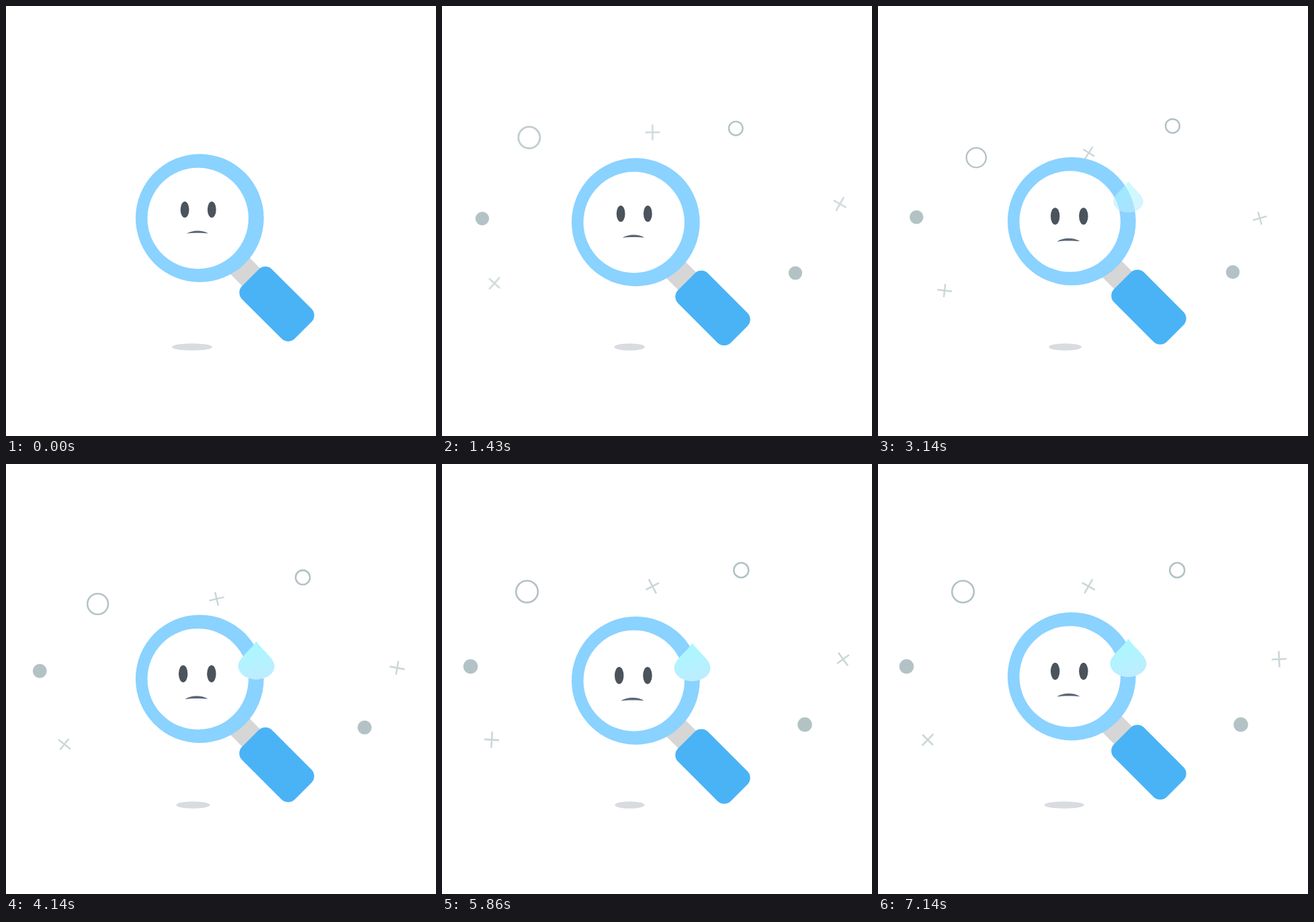
Write an HTML page that moves like this. It is 640 px wide and 640 px high and loops after 7.21 s.

```html
<!DOCTYPE html>
<html lang="en">
<head>
<meta charset="utf-8">
<title>Searching magnifier</title>
<style>
  html, body { margin: 0; width: 100%; height: 100%; overflow: hidden; background: #fff; }
  svg { display: block; width: 100vw; height: 100vh; }
  .ring { fill: none; stroke: #b3c2c6; stroke-width: 2.6; }
  .dot { fill: #b3c3c5; }
  .cross { fill: none; stroke: #cbd6d8; stroke-width: 2.6; }
</style>
</head>
<body>
<svg viewBox="0 0 640 640">
  <defs>
    <linearGradient id="water" x1="0" y1="0" x2="0.25" y2="1">
      <stop offset="0" stop-color="#a6faff"/>
      <stop offset="1" stop-color="#bcedff"/>
    </linearGradient>
    <path id="plus" class="cross" d="M-11 0H11M0-12V12"/>
  </defs>

  <ellipse id="shadow" cy="507.5" ry="5.2" fill="#d8dbe0"/>

  <!-- Particles are placed relative to the point they burst from -->
  <g id="slowBurst">
    <circle class="ring" cx="127.3" cy="-383" r="11"/>
    <circle class="dot" cx="-275.5" cy="-239.7" r="10.8"/>
    <circle class="dot" cx="222" cy="-153.2" r="10.8"/>
  </g>
  <g id="fastBurst">
    <circle class="ring" cx="-191.5" cy="-347" r="16.3"/>
    <g transform="translate(-244 -126.5)"><use id="leftCross" href="#plus"/></g>
    <g transform="translate(-4.7 -355)"><use id="topCross" href="#plus"/></g>
    <g transform="translate(279 -246.5)"><use id="rightCross" href="#plus"/></g>
  </g>

  <g id="magnifier">
    <g transform="translate(403 443.5) rotate(45)">
      <rect x="-105" y="-20" width="60" height="37.3" fill="#d6d6d6"/>
      <rect x="-55.5" y="-31.5" width="111" height="63" rx="14" fill="#4ab3f6"/>
    </g>
    <circle cx="288.3" cy="315.7" r="95.4" fill="#8ad2ff"/>
    <circle cx="285.7" cy="316" r="75.2" fill="#fff"/>
    <g id="face">
      <g id="eyes" fill="#4b535c">
        <ellipse cx="-20.1" rx="6.4" ry="12.1"/>
        <ellipse cx="20.1" rx="6.4" ry="12.1"/>
      </g>
      <path fill="#596878" d="M-17.7 36C-9 30 6 30 15 35.5C8 34.8-10 34.3-17.7 36Z"/>
    </g>
    <path id="drop" fill="url(#water)"
      d="M0-28.5C8-15.5 27-3.5 27 8.5C27 19.5 15 28.5 0 28.5C-15 28.5-27 19.5-27 8.5C-27-3.5-8-15.5 0-28.5Z"/>
  </g>
</svg>
<script>
const LOOP = 7210, FPS = 14, BOB = 2400;
const el = id => document.getElementById(id);
const set = (id, name, value) => el(id).setAttribute(name, value);

// Linear interpolation through [time, value] pairs
function track(t, ...keys) {
  if (t <= keys[0][0]) return keys[0][1];
  for (let i = 1; i < keys.length; i++) {
    const [t0, v0] = keys[i - 1], [t1, v1] = keys[i];
    if (t < t1) return v0 + (v1 - v0) * (t - t0) / (t1 - t0);
  }
  return keys[keys.length - 1][1];
}

function burst(id, y, scale, opacity) {
  set(id, 'transform', `translate(318 ${y}) scale(${scale})`);
  set(id, 'opacity', opacity);
}

function draw(t) {
  const bob = 1 - Math.abs(1 - (t % BOB) / (BOB / 2));
  set('magnifier', 'transform', `translate(0 ${7.5 * bob})`);
  set('shadow', 'cx', 277 + 2.6 * bob);
  set('shadow', 'rx', 30 - 9 * bob);

  burst('slowBurst', 541, track(t, [0, 0], [1685, 1.105], [2860, .939], [5250, 1]),
    track(t, [300, 0], [1190, 1]));
  burst('fastBurst', 537, track(t, [390, 0], [1610, 1.155], [2800, .88], [5200, 1]),
    track(t, [660, 0], [1500, 1]));

  const s = t / 1000;
  set('leftCross', 'transform', `rotate(${-4 + 32 * s})`);
  set('topCross', 'transform', `rotate(${44.3 * Math.max(0, s - 2.41)})`);
  set('rightCross', 'transform', `rotate(${-7 + 25.8 * s})`);

  const look = track(t, [1680, 0], [2850, 1]);
  set('face', 'transform',
    `translate(${286.2 - 1.4 * look} ${303 + 5.2 * look}) scale(${1 + .05 * look})`);
  set('eyes', 'transform',
    `scale(1 ${track(t, [1900, 1], [2100, .4], [2300, 1])})`);

  const fall = track(t, [2700, 0], [3430, 1]);
  set('drop', 'transform',
    `translate(372.6 ${265.7 + 22.5 * fall}) scale(${.55 + .45 * fall})`);
  set('drop', 'opacity', fall);
}

const start = performance.now();
function tick() {
  const t = (performance.now() - start) % LOOP;
  draw(Math.min(100, Math.floor((t + 5) * FPS / 1000)) * 1000 / FPS);
  requestAnimationFrame(tick);
}
tick();
</script>
</body>
</html>
```
